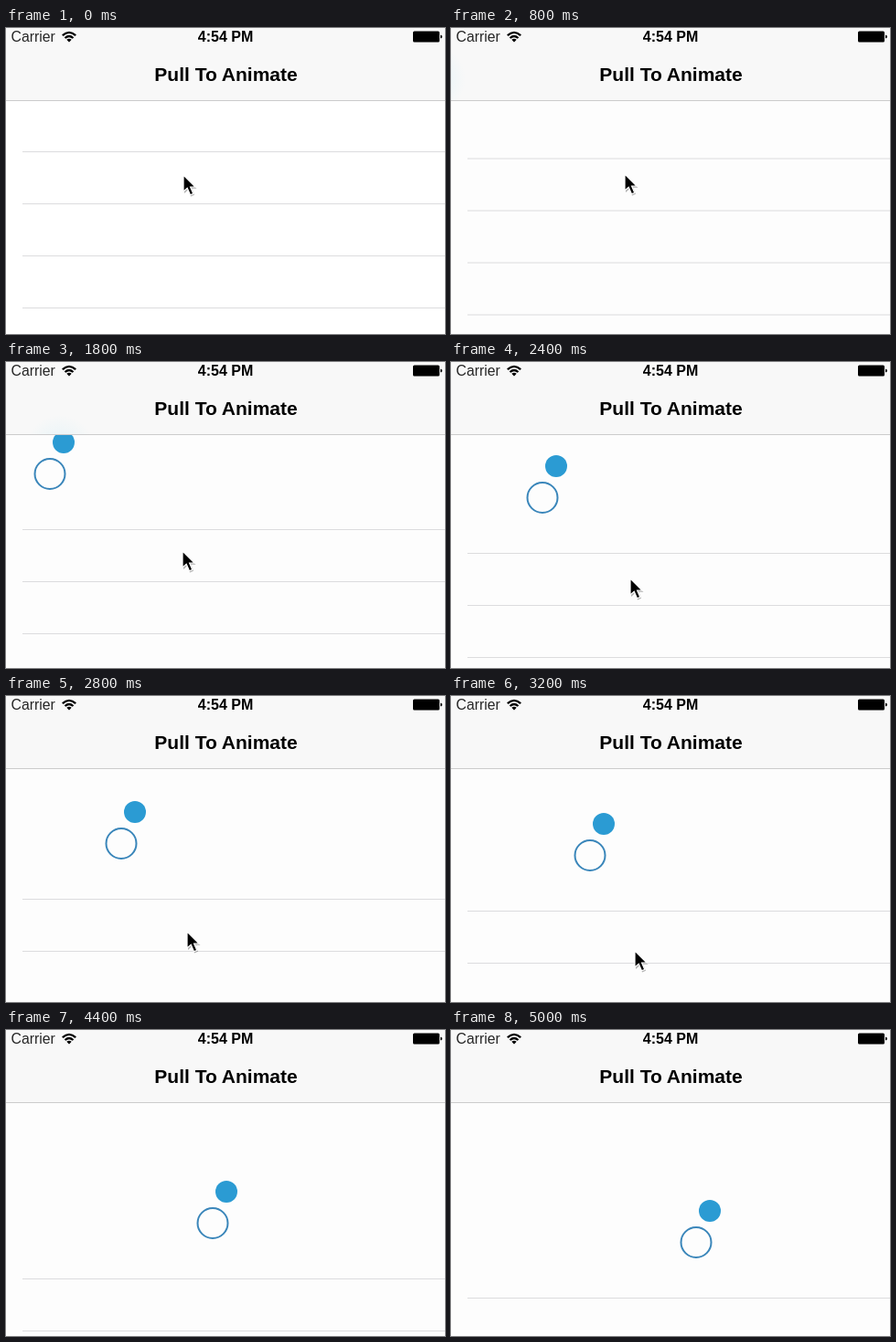
An HTML page that plays this animation: 480 by 335 pixels, repeating every 5100 ms.

```html
<!DOCTYPE html>
<html lang="en">
<head>
<meta charset="utf-8">
<title>Pull To Animate</title>
<style>
  html, body { margin: 0; width: 100%; height: 100%; overflow: hidden; background: #fff; }
  svg { display: block; width: 480px; height: 335px; }
  text { font-family: "Liberation Sans", Arial, sans-serif; fill: #000; }
</style>
</head>
<body>
<svg viewBox="0 0 480 335">
  <defs>
    <radialGradient id="haze">
      <stop offset="0" stop-color="#d8f0f7" stop-opacity=".6"/>
      <stop offset="1" stop-color="#d8f0f7" stop-opacity="0"/>
    </radialGradient>
    <clipPath id="bar"><rect width="480" height="79"/></clipPath>
  </defs>

  <rect id="table" width="480" height="335"/>
  <g id="rows" fill="#dcdcde"></g>
  <g id="badge">
    <circle r="12" fill="#2b9bd3"/>
    <circle cx="-15" cy="34.5" r="16.5" fill="none" stroke="#3a86ba" stroke-width="2"/>
  </g>

  <rect width="480" height="79" fill="#f8f8f8"/>
  <g clip-path="url(#bar)"><circle id="glow" r="38" fill="url(#haze)"/></g>
  <rect y="79" width="480" height="1" fill="#cbcbcc"/>

  <text x="5.5" y="15" font-size="15.8" fill-opacity=".85">Carrier</text>
  <text x="240" y="15" font-size="16" font-weight="bold" text-anchor="middle">4:54 PM</text>
  <text x="240.5" y="58.4" font-size="21" font-weight="bold" text-anchor="middle">Pull To Animate</text>

  <g fill="none" stroke="#000" stroke-width="2.3">
    <path d="M61.8 8.1Q69 1.6 76.2 8.1"/>
    <path d="M64.5 11Q69 7 73.5 11"/>
  </g>
  <path d="M66.3 12.8Q69 10.6 71.7 12.8L69 15.6Z"/>
  <rect x="445" y="3.5" width="29" height="12" rx="1.5"/>
  <path d="M475 7.5q2 .3 2 2t-2 2z"/>

  <g id="cursor">
    <path d="M1 2V20L5 16.2L8 23.5L12 21.8L9 14.8H14.5Z" opacity=".3"/>
    <path d="M0 0V18L4.2 14.3L7.5 21.8L10.8 20.4L7.6 13H13Z" stroke="#fff" stroke-width="1.2"/>
  </g>
</svg>
<script>
const LOOP = 5100, STEP = 100, ROW = 57, GRAB = 500;
const $ = id => document.getElementById(id);

// Pull distance: [time, px]
const pull = [[GRAB, 0], [1200, 17], [1800, 48], [2400, 74], [3200, 100], [3900, 119.5], [5000, 158]];

function pullAt(t) {
  const i = pull.findIndex(([end]) => t <= end);
  if (i < 1) return 0;
  const [t0, v0] = pull[i - 1], [t1, v1] = pull[i];
  return v0 + (v1 - v0) * (t - t0) / (t1 - t0);
}

// A short flick up to the grab point, then a slowly accelerating drag
function cursorAt(t) {
  const flick = Math.min(t / 200, 1), u = Math.max(t - GRAB, 0) / 3400;
  return [194 - 4 * flick + 16 * u ** 1.8, 161 - 14 * flick + 150 * u + 20 * u * u];
}

const rows = Array.from({ length: 4 }, () => {
  const r = document.createElementNS("http://www.w3.org/2000/svg", "rect");
  r.setAttribute("x", 18);
  r.setAttribute("width", 462);
  r.setAttribute("height", 1);
  return $("rows").appendChild(r);
});

const move = (id, x, y) => $(id).setAttribute("transform", `translate(${x} ${y})`);

function draw(ms) {
  const t = Math.floor(ms % LOOP / STEP) * STEP;
  const p = Math.round(pullAt(t) * 2) / 2;
  const x = 2 * p - 33, y = p + 40;

  $("table").setAttribute("fill", p ? "#fdfdfd" : "#fff");
  rows.forEach((r, i) => r.setAttribute("y", 135 + i * ROW + p));
  move("badge", x, y);
  move("glow", x - 4, y + 8);
  $("glow").setAttribute("visibility", p ? "visible" : "hidden");
  move("cursor", ...cursorAt(t).map(Math.round));
}

let start;
function tick(now) {
  start ??= now;
  draw(now - start);
  requestAnimationFrame(tick);
}
draw(0);
requestAnimationFrame(tick);
</script>
</body>
</html>
```
